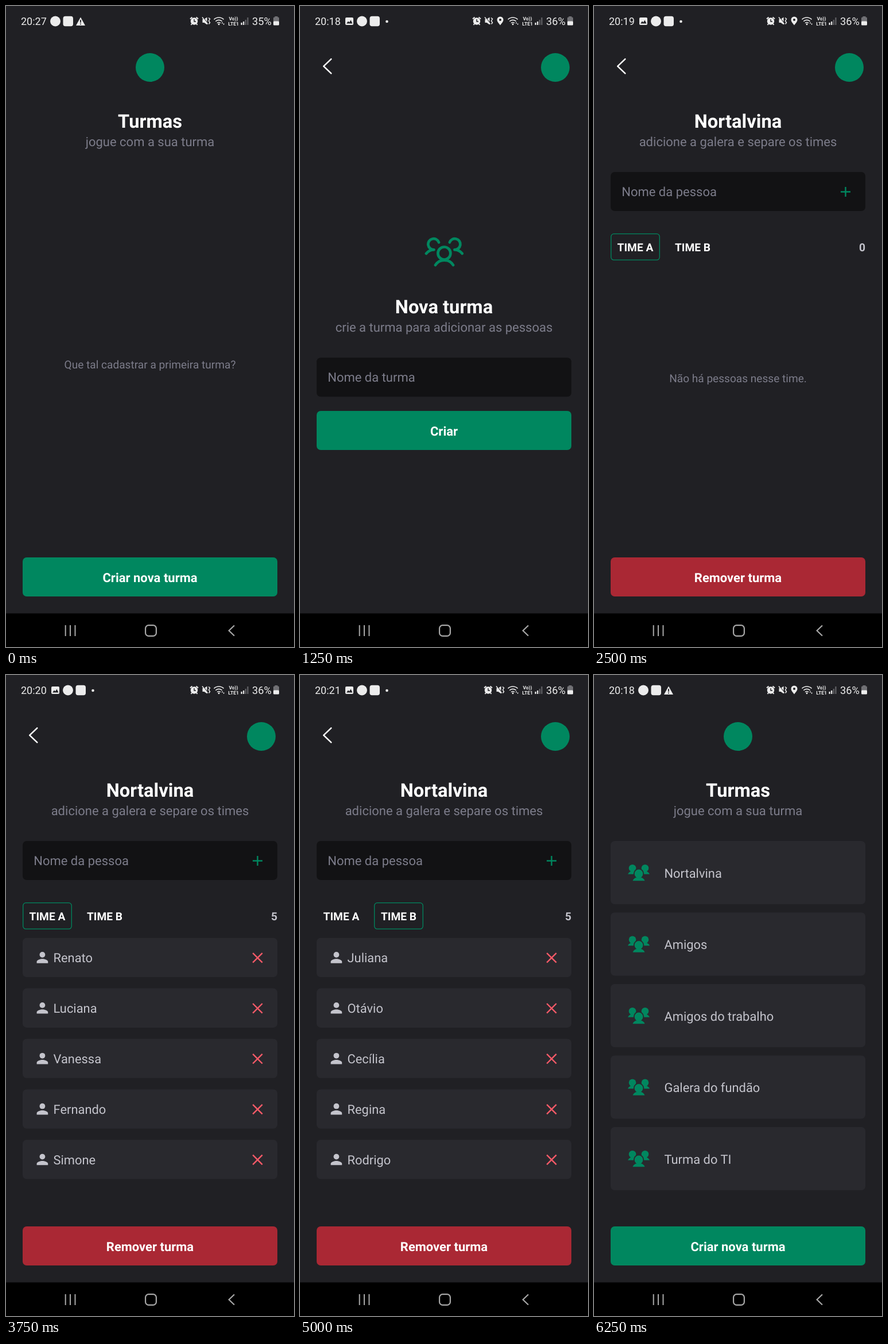
Write an HTML page that moves like this. It is 502x1116 px and loops after 7500 ms.

```html
<!DOCTYPE html>
<html lang="pt-BR">
<head>
<meta charset="utf-8">
<style>
  html, body { margin: 0; width: 100%; height: 100%; overflow: hidden; background: #202024; }
  svg { display: block; width: 100vw; height: 100vh; }
  text { font-family: Roboto, sans-serif; text-rendering: geometricPrecision; }
</style>
</head>
<body>
<svg id="stage" viewBox="0 0 502 1116"></svg>
<script>
const GREEN = '#00875f', RED = '#aa2834', CARD = '#29292e', INPUT = '#121214';
const GRAY = '#7c7c8a', LIGHT = '#c4c4cc', WHITE = '#fff', BG = '#202024', ICON = '#ececec';
const STEP = 1250;

const text = (s, x, y, size, fill, anchor = 'middle', weight = 400) =>
  `<text x="${x}" y="${y}" font-size="${size}" fill="${fill}" text-anchor="${anchor}" font-weight="${weight}">${s}</text>`;
const rect = (x, y, w, h, r, fill, more = '') =>
  `<rect x="${x}" y="${y}" width="${w}" height="${h}" rx="${r}" fill="${fill}" ${more}/>`;
const circle = (x, y, r, fill, more = '') => `<circle cx="${x}" cy="${y}" r="${r}" fill="${fill}" ${more}/>`;
const shape = (d, fill) => `<path d="${d}" fill="${fill}"/>`;
const line = (d, color, w, more = '') => `<path d="${d}" fill="none" stroke="${color}" stroke-width="${w}" ${more}/>`;
const at = (x, y, body) => `<g transform="translate(${x} ${y})">${body}</g>`;
const round = 'stroke-linecap="round" stroke-linejoin="round"';

// Status bar icons, centred on their own origin
const alarm = circle(0, .5, 6.2, ICON) + line('M-7 -3.5L-3.5 -6.5M7 -3.5L3.5 -6.5M-4 5L-5.5 7M4 5L5.5 7', ICON, 2) +
  line('M0 -3V1H3', BG, 1.4);
const mute = shape('M-6.5 -3H-3.5L1.5 -6.5V6.5L-3.5 3H-6.5Z', ICON) + line('M-6 -6.8L3.5 5', BG, 1.2) +
  line('M-7 -6.5L2.5 5.5', ICON, 1.5) + line('M4 -5.5L6.5 -3.5L4.5 0L6.5 3L4.5 5.5', ICON, 1.5);
const pin = shape('M0 7.5C-3 3.5 -5.5 1 -5.5 -2A5.5 5.5 0 0 1 5.5 -2C5.5 1 3 3.5 0 7.5Z', ICON) + circle(0, -2, 2, BG);
const photo = rect(-7, -6, 14, 13, 2, ICON) + shape('M-5 4.5L-2 .5L0 2.5L2.5 -1.5L5.5 4.5Z', BG);
const warning = shape('M0 -7.5L8 7H-8Z', ICON) + line('M0 -3V2M0 3.5V5.3', BG, 1.8);
const wifi = line('M-8.5 -2.5A12 12 0 0 1 8.5 -2.5M-5.7 .8A8 8 0 0 1 5.7 .8M-3 3.8A4.2 4.2 0 0 1 3 3.8', ICON, 1.6) +
  circle(0, 5.8, 1.5, ICON) + shape('M4.5 4.2L6 2L7.5 4.2ZM7 4.8H10L8.5 7Z', ICON);

function statusBar({ clock, level = '36%', photos, place }) {
  const dx = photos ? 22 : 0, left = place ? -20 : 0;
  const bars = [4, 6, 9, 13].map((h, i) => rect(409.5 + i * 3.6, 33 - h, 2.2, h, 0, i < 2 ? ICON : '#626266')).join('');
  return text(clock, 26, 32.7, 18, ICON, 'start') +
    (photos ? at(86, 26, photo) + circle(151.5, 27, 2.3, ICON) : at(130, 27, warning)) +
    circle(86 + dx, 26.5, 9, ICON) + rect(99.5 + dx, 17.8, 17.5, 17.5, 4, ICON) +
    at(328 + left, 26, alarm) + at(349 + left, 26, mute) + (place ? at(349, 26, pin) : '') + at(371, 26, wifi) +
    text('Vo))', 396.5, 25, 8.5, ICON, 'middle', 700) + text('LTE1', 396.5, 34, 8.5, ICON, 'middle', 700) +
    bars + text(level, 429, 32.7, 18.2, ICON, 'start') +
    rect(466, 19.5, 10, 14, 1.5, '#707074') + rect(468.5, 18, 5, 2, 0, '#707074') + rect(466, 26.5, 10, 7, 1.5, ICON);
}

const navBar = rect(0, 1057.5, 502, 58.5, 0, '#000') +
  line('M103.7 1078V1097M112 1078V1097M120.5 1078V1097', '#a8a8a8', 2) +
  rect(243.1, 1078.1, 18.8, 18.8, 5.5, 'none', 'stroke="#a8a8a8" stroke-width="2.2"') +
  line('M398 1078.5L388.6 1087.5L398 1096.5', '#a8a8a8', 2.2);

const header = back => circle(back ? 445 : 251, 107, 25, GREEN) +
  (back ? line('M54.3 92.3L41.2 104.8L54.3 117.3', WHITE, 2.5, round) : '');
const title = (main, sub, y) => text(main, 251, y, 32.7, WHITE, 'middle', 700) + text(sub, 251, y + 32, 22, GRAY);
const button = (label, y, fill) => rect(29, y, 444, 68, 7, fill) + text(label, 251, y + 42.5, 22, WHITE, 'middle', 700);
const input = (hint, y) => rect(29, y, 444, 68, 7, INPUT) + text(hint, 48.2, y + 42, 22, GRAY, 'start');

const halfOutline = 'M242 411.5A9.6 9.6 0 1 0 233.5 424.3A17 17 0 0 0 220 431';
const crowd = line(`${halfOutline}M236 451A18.5 18.5 0 0 1 267 451`, GREEN, 4.7, round) +
  `<g transform="translate(502.8 0) scale(-1 1)">${line(halfOutline, GREEN, 4.7, round)}</g>` +
  circle(251.4, 430.5, 11, BG, `stroke="${GREEN}" stroke-width="4.7"`);

const mate = circle(-11, -8.3, 6.3, GREEN) + shape('M-19 2.2A11 9 0 0 1 -7 -3.8V2.2Z', GREEN);
const smallCrowd = mate + `<g transform="scale(-1 1)">${mate}</g>` + circle(0, 1.5, 9.2, CARD) +
  shape('M-10.5 13.8A11 9.5 0 0 1 10.5 13.8Z', GREEN) + circle(0, 1.5, 7.4, GREEN);

const groupCard = (name, i) => at(0, 289 + i * 124.5,
  rect(29, 0, 444, 110, 7, CARD) + at(78, 55.5, smallCrowd) + text(name, 122.5, 63.5, 21.9, LIGHT, 'start'));

const playerCard = (name, i) => at(0, 457.7 + i * 87.9,
  rect(29, 0, 444, 68.3, 7, CARD) + circle(63.4, 29.3, 4.9, LIGHT) +
  shape('M63.4 36.6C60.1 36.6 53.6 38.3 53.6 41.5V44H73.2V41.5C73.2 38.3 66.7 36.6 63.4 36.6Z', LIGHT) +
  line('M430.2 26.4L446.8 43M446.8 26.4L430.2 43', '#f75a68', 2.4) +
  text(name, 82.5, 42.3, 21.9, LIGHT, 'start'));

const home = groups => header(false) + title('Turmas', 'jogue com a sua turma', 211.7) +
  (groups.length ? groups.map(groupCard).join('') : text('Que tal cadastrar a primeira turma?', 251, 631.3, 19.1, GRAY)) +
  button('Criar nova turma', 960, GREEN);

const newGroup = () => header(true) + crowd + title('Nova turma', 'crie a turma para adicionar as pessoas', 535) +
  input('Nome da turma', 612.3) + button('Criar', 705, GREEN);

const team = (tab, players) => header(true) + title(GROUP, 'adicione a galera e separe os times', 211.7) +
  input('Nome da pessoa', 289) + line('M438.5 315V332M430 323.5H447', GREEN, 2.4) +
  rect(29.7 + tab * 100, 396.7, 84.6, 45.5, 5, 'none', `stroke="${GREEN}" stroke-width="1.3"`) +
  text('TIME A', 72, 427, 19.2, WHITE, 'middle', 700) + text('TIME B', 172, 427, 19.2, WHITE, 'middle', 700) +
  text(players.length, 473, 427, 19.2, LIGHT, 'end', 700) +
  (players.length ? players.map(playerCard).join('') : text('Não há pessoas nesse time.', 251, 655, 19.1, GRAY)) +
  button('Remover turma', 960, RED);

const GROUP = 'Nortalvina';
const teamA = ['Renato', 'Luciana', 'Vanessa', 'Fernando', 'Simone'];
const teamB = ['Juliana', 'Otávio', 'Cecília', 'Regina', 'Rodrigo'];
const groups = [GROUP, 'Amigos', 'Amigos do trabalho', 'Galera do fundão', 'Turma do TI'];

const scenes = [
  [{ clock: '20:27', level: '35%' }, home([])],
  [{ clock: '20:18', photos: true, place: true }, newGroup()],
  [{ clock: '20:19', photos: true, place: true }, team(0, [])],
  [{ clock: '20:20', photos: true }, team(0, teamA)],
  [{ clock: '20:21', photos: true }, team(1, teamB)],
  [{ clock: '20:18', place: true }, home(groups)]
].map(([status, body]) => rect(0, 0, 502, 1116, 0, BG) + statusBar(status) + body + navBar);

const stage = document.getElementById('stage');
const start = performance.now();
let shown = -1;
function draw() {
  const i = Math.floor((performance.now() - start) / STEP) % scenes.length;
  if (i !== shown) stage.innerHTML = scenes[shown = i];
  requestAnimationFrame(draw);
}
draw();
</script>
</body>
</html>
```
